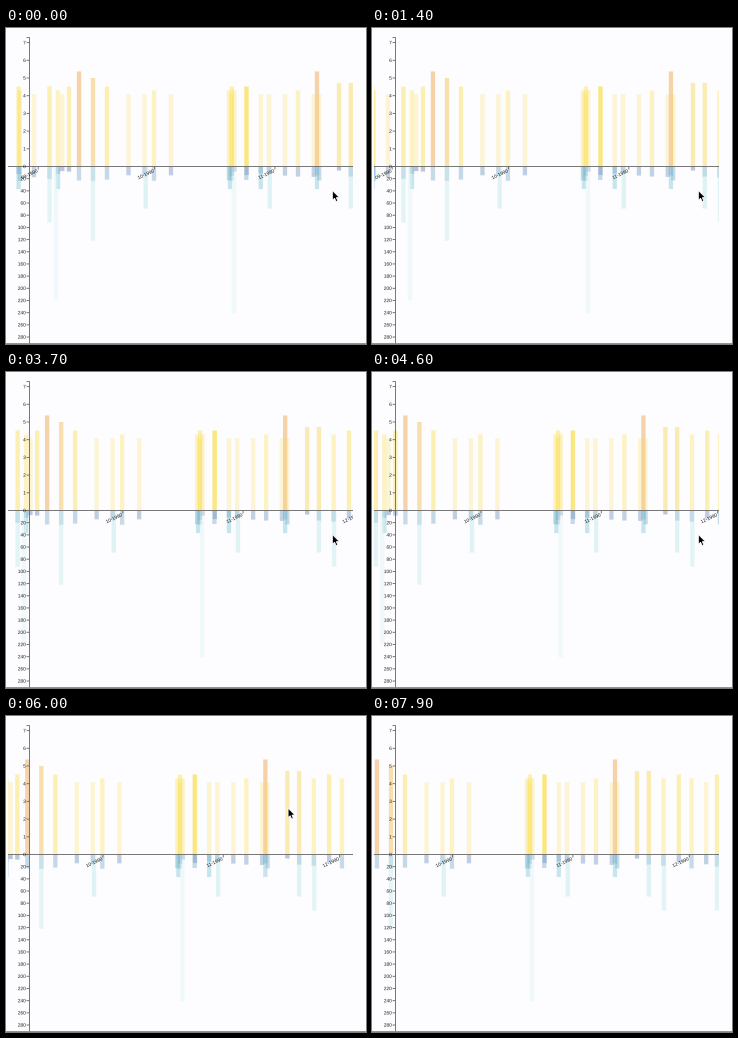
Write a matplotlib script that moves like this. It is 360 px wide and 316 px high and loops after 8 s.

```python
import numpy as np
import matplotlib.pyplot as plt
from matplotlib.animation import FuncAnimation
from matplotlib.patches import PathPatch, Polygon, Rectangle
from matplotlib.textpath import TextPath
from matplotlib.transforms import Affine2D

W, H, DPI = 360, 316, 100
FRAMES, STEP = 80, 100
BASE, AXIS = 138.5, 23.5          # zero line and value axis, in pixels
UNIT, DEPTH = 17.7, 0.609         # pixels per unit above / below zero
DAY = 3.88                        # pixels per day
SPEED = 0.861                     # scroll, pixels per frame
BAR, FONT = 4.3, 4.8
INK = "#6a6a6a"

plt.rcParams["font.family"] = ["Liberation Sans", "DejaVu Sans"]

# value: where it occurs along the time line
PEAKS = {
    5.37: (73, 311),
    5.0: (87,),
    4.72: (333, 344.8),
    4.52: (12.6, 43.5, 63, 101, 225.8, 240.3, 240.7, 374.8, 413),
    4.3: (13.8, 52, 148, 223, 228.3, 292, 359.5, 387.6),
    4.08: (28, 56.3, 122.5, 138.5, 165, 225.5, 254.8, 263, 279, 307.8,
           313.2, 402.2),
}
DEEP = {
    37: (12.6, 52, 224, 254.8, 311),
    69: (139.7, 263.8, 344.8),
    92: (43.5, 360, 413),
    122: (87,),
    220: (50,),
    241: (228,),
}


def blend(value, stops, colors):
    return tuple(np.interp(value, stops, ch) / 255 for ch in zip(*colors))


def warm(value):
    return blend(value, (4.6, 5, 5.4),
                 [(250, 220, 55), (240, 190, 75), (238, 166, 80)])


def cool(value):
    return blend(value, (8, 20, 40, 70, 240),
                 [(95, 120, 176), (120, 165, 196), (135, 207, 217),
                  (190, 233, 233), (226, 247, 245)])


fig = plt.figure(figsize=(W / DPI, H / DPI), dpi=DPI, facecolor="#fdfcff")
ax = fig.add_axes([0, 0, 1, 1])
ax.set(xlim=(0, W), ylim=(H, 0))
ax.axis("off")

window = Rectangle((1.5, 0), 345.5, H, transform=ax.transData)
shift = Affine2D()
moving = shift + ax.transData


def add(patch, scroll=False):
    patch.set_snap(False)
    patch.set_transform(moving if scroll else ax.transData)
    ax.add_patch(patch)
    if scroll:
        patch.set_clip_path(window)
    return patch


def line(x0, y0, x1, y1, scroll=False, color=INK):
    add(Polygon([(x0, y0), (x1, y1)], closed=False, fill=False, ec=color,
                lw=0.9 * 72 / DPI, capstyle="butt", zorder=3), scroll)


def label(x, y, text, angle=0, scroll=False):
    """Right-aligned text, vertically centred on (x, y)."""
    path = TextPath((0, 0), text, size=FONT)
    place = Affine2D().translate(-path.get_extents().x1, -0.34 * FONT)
    place.scale(1, -1).rotate_deg(-angle).translate(x, y)
    add(PathPatch(place.transform_path(path), fc="#1c1c1c", lw=0, zorder=4),
        scroll)


def bar(x, height, color, alpha):
    add(Rectangle((x - BAR / 2, BASE), BAR, height, fc=color, lw=0,
                  alpha=alpha, zorder=1), scroll=True)


rng = np.random.default_rng(4)
for value, places in PEAKS.items():
    alpha = np.interp(value, (4.08, 4.5, 5.4), (0.22, 0.38, 0.5))
    for x in places:
        bar(x, -UNIT * value, warm(value), alpha)
        shallow = rng.uniform(5, 24)
        bar(x, DEPTH * shallow, cool(shallow), 0.42)
for value, places in DEEP.items():
    for x in places:
        bar(x, DEPTH * value, cool(value), 0.45)

# month ticks scroll with the bars
for month, day in zip(range(9, 13), (0, 30, 61, 91)):
    x = 32.2 + DAY * day
    line(x, BASE, x, BASE + 3, scroll=True)
    label(x - 1, BASE + 4.1, f"{month:02d}-1990", angle=25, scroll=True)

# fixed axes
line(AXIS, 9.5, AXIS, H)
line(2, BASE, 347, BASE)
line(0, 315.5, W, 315.5, color="#888888")
line(20.6, 9.5, AXIS, 9.5)
rows = [(BASE - UNIT * n, n) for n in range(8)]
rows += [(BASE + DEPTH * n, n) for n in range(20, 281, 20)]
for y, n in rows:
    line(20.6, y, AXIS, y)
    label(19.6, y, str(n))

ARROW = np.array([(0, 0), (0, 9.4), (2.1, 7.5), (3.6, 10.8), (5.2, 10.1),
                  (3.8, 6.9), (6.7, 6.7)])
cursor = add(Polygon(ARROW, fc="black", ec="white", lw=0.5, zorder=6))


def update(i):
    shift.clear().translate(-SPEED * i, 0)
    p = np.clip((i - 55) / 5, 0, 1)
    p = p * p * (3 - 2 * p)
    cursor.set_xy(ARROW + (326.5 - 44.4 * p, 162.7 - 70.5 * p))
    cursor.set_visible(i < 65)
    return []


anim = FuncAnimation(fig, update, frames=FRAMES, interval=STEP,
                     repeat=True, repeat_delay=0, blit=False)
plt.show()
```
